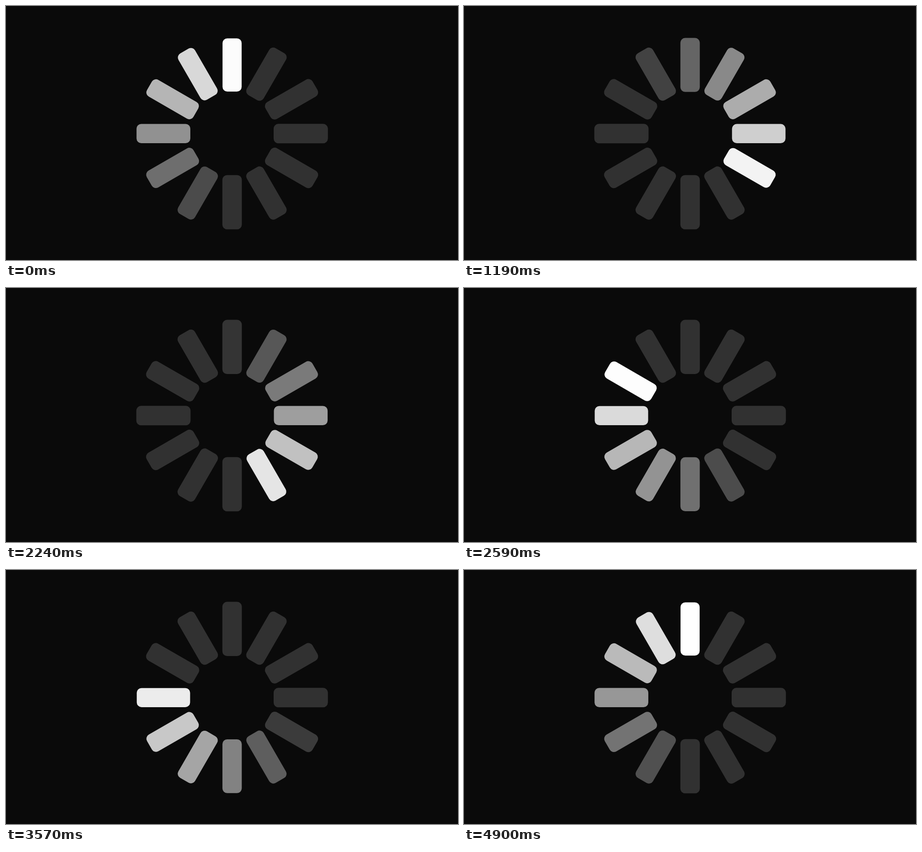
An HTML page with a canvas that plays this animation: 998 by 561 pixels, repeating every 4.97 s.

```html
<!DOCTYPE html>
<html lang="en">
<head>
<meta charset="utf-8">
<title>Loading spinner</title>
<style>
  html, body { margin: 0; height: 100%; overflow: hidden; background: #0a0a0a; }
  canvas { display: block; }
</style>
</head>
<body>
<canvas id="stage" width="998" height="561"></canvas>
<script>
const ctx = document.getElementById('stage').getContext('2d');
const LOOP = 4970, TICK = 70, BARS = 12;
const DARK = 49, WHITE = 255;

// [tick, bars lit so far]: the sweep starts quickly and slows at the end
const SWEEP = [[0, 0.15], [7, 7.8], [17, 16.4], [32, 29.8], [42, 38.4], [51, 45.6], [64, 56.9], [70, 60]];

function sweepAt(tick) {
  const next = Math.max(1, SWEEP.findIndex(([key]) => key >= tick));
  const [t0, p0] = SWEEP[next - 1], [t1, p1] = SWEEP[next];
  return p0 + (p1 - p0) * (tick - t0) / (t1 - t0);
}

function drawBar(index, age) {
  const grey = Math.round(Math.min(WHITE, Math.max(DARK, 257 - 35.4 * age)));
  const glow = (grey - DARK) / (WHITE - DARK);
  const inset = 1.1 * glow;              // bright bars are slightly smaller
  const width = 43 - 0.8 * glow;
  ctx.save();
  ctx.translate(499.2, 281.8);
  ctx.rotate(index * 2 * Math.PI / BARS);
  ctx.fillStyle = `rgb(${grey}, ${grey}, ${grey})`;
  ctx.beginPath();
  ctx.roundRect(-width / 2, -211.5 + inset, width, 119.8 - 2 * inset, 10.5);
  ctx.fill();
  ctx.restore();
}

function render(now) {
  const sweep = sweepAt(Math.floor(now % LOOP / TICK));
  ctx.fillStyle = '#0a0a0a';
  ctx.fillRect(0, 0, 998, 561);
  for (let i = 0; i < BARS; i++) drawBar(i, (sweep - i + BARS) % BARS);
}

const start = performance.now();
function loop() {
  render(performance.now() - start);
  requestAnimationFrame(loop);
}
loop();
</script>
</body>
</html>
```
